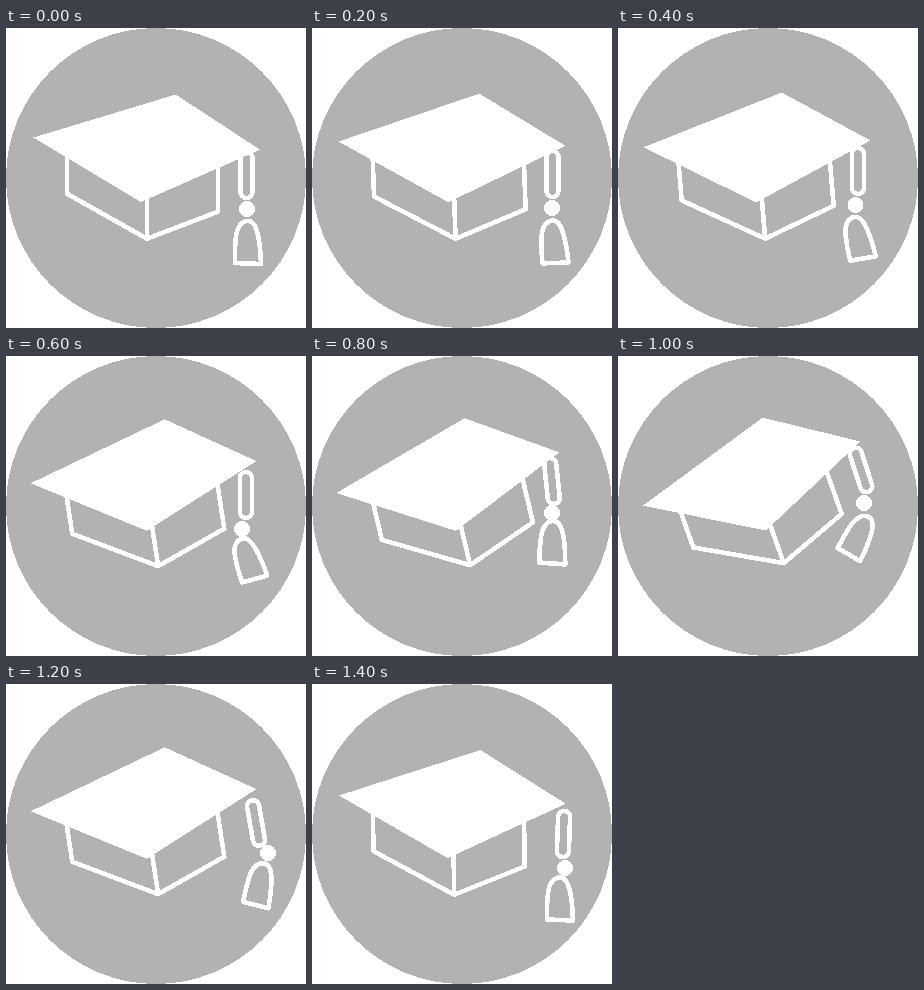
An HTML page without scripts that plays this animation: 300 px wide and 300 px high, repeating every 1600 ms.

```html
<!DOCTYPE html>
<html lang="en">
<head>
<meta charset="utf-8">
<title>Graduation cap</title>
<style>
  html, body { margin: 0; width: 100%; height: 100%; overflow: hidden; background: #fff; }
  svg { display: block; width: 100%; height: 100%; shape-rendering: crispEdges; animation: swing 1.6s step-end infinite; }

  .line { fill: none; stroke: #fff; stroke-width: 4.6; stroke-linejoin: round; }
  .cap  { transform-origin: 143px 137px; rotate: var(--cap); }
  .rope { translate: var(--rope); rotate: var(--rope-turn); }
  .ball { translate: var(--ball); }
  .bell { translate: var(--bell); rotate: var(--bell-turn); }

  /* The pose is held for 200 ms per step; the tassel lags behind the cap. */
  @keyframes swing {
    0%, 100% { --cap: 0deg;     --rope: 240.5px 147px; --rope-turn: 0deg;   --ball: 241px 181px;   --bell: 242px 215px;     --bell-turn: 0deg; }
    12.5%    { --cap: -2deg;    --rope: 240.5px 146px; --rope-turn: 0deg;   --ball: 240px 180px;   --bell: 242px 214.5px;   --bell-turn: -4deg; }
    25%      { --cap: -4.8deg;  --rope: 240px 143px;   --rope-turn: 0deg;   --ball: 237.5px 177px; --bell: 240.7px 210.5px; --bell-turn: -12deg; }
    37.5%    { --cap: -8.7deg;  --rope: 240px 139px;   --rope-turn: 0deg;   --ball: 236px 173px;   --bell: 242.5px 203.5px; --bell-turn: -17.5deg; }
    50%      { --cap: -13.4deg; --rope: 240px 125px;   --rope-turn: -6deg;  --ball: 240px 157px;   --bell: 241px 187px;     --bell-turn: 2deg; }
    62.5%    { --cap: -19.5deg; --rope: 243px 114px;   --rope-turn: -18deg; --ball: 246px 147px;   --bell: 240.5px 180.5px; --bell-turn: 28deg; }
    75%      { --cap: -8.7deg;  --rope: 250px 139px;   --rope-turn: -10deg; --ball: 262px 169px;   --bell: 254px 201px;     --bell-turn: 12deg; }
    87.5%    { --cap: -1deg;    --rope: 251.5px 150px; --rope-turn: 2deg;   --ball: 253px 184px;   --bell: 248px 215.5px;   --bell-turn: 0deg; }
  }
</style>
</head>
<body>
<svg viewBox="0 0 300 300">
  <circle cx="150" cy="150" r="150" fill="#b2b2b2"/>
  <rect class="line rope" x="-6" y="-23" width="12" height="46" rx="6"/>
  <circle class="ball" r="8" fill="#fff"/>
  <path class="line bell" d="M-13 20 L13 21 Q12.500 4 10 -8 C8 -17 5 -22 0 -22 C-7 -22 -11 -15 -12 -7 Q-13.500 6 -13 20Z"/>
  <g class="cap">
    <path d="M27.500 109.500 L169.700 66.500 L254 121.700 L135 174Z" fill="#fff"/>
    <path class="line" d="M61 126 V165.700 L141 210.700 L212 183.700 V136 M141 168 V210.700"/>
  </g>
</svg>
</body>
</html>
```
